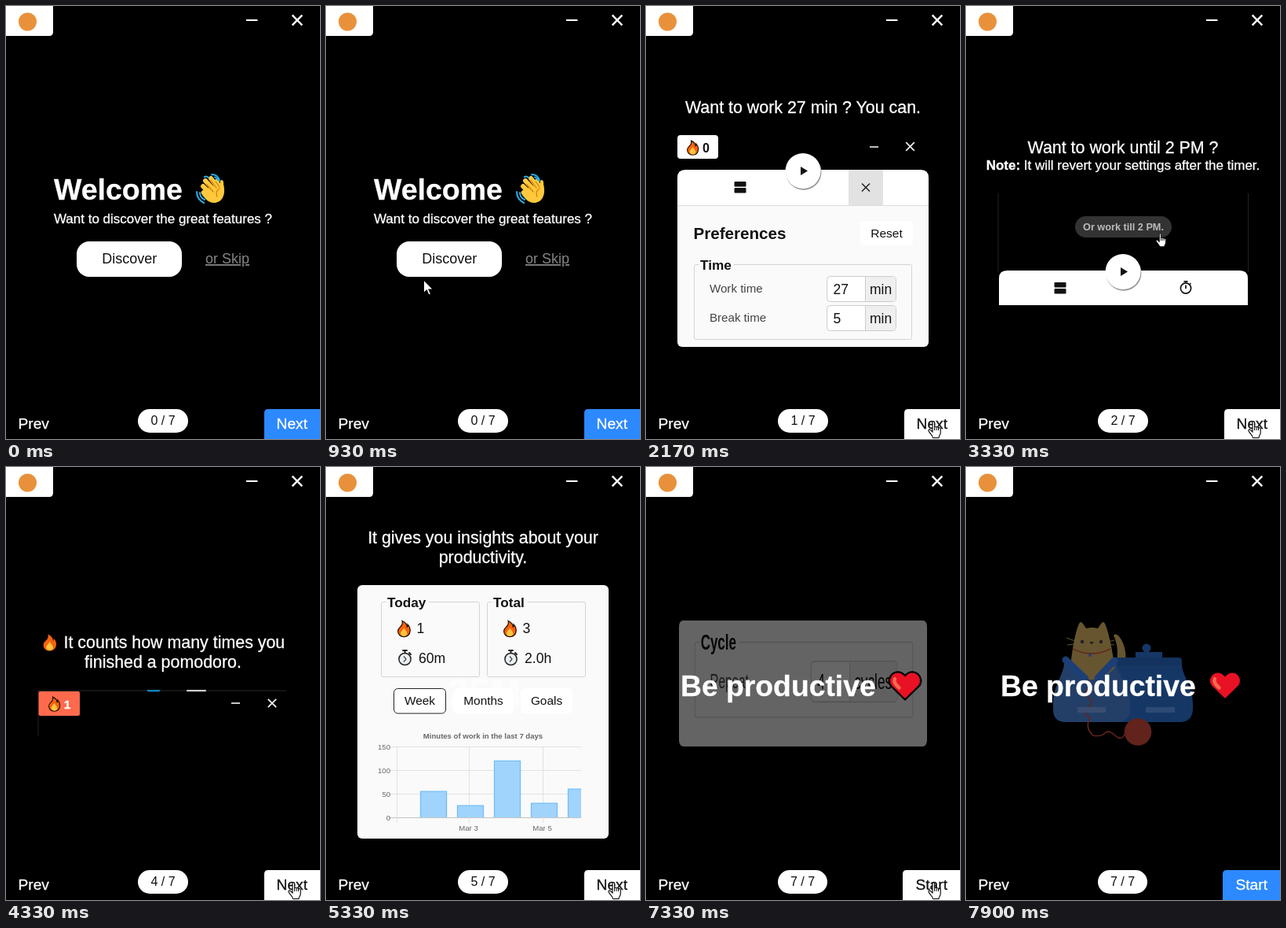
These frames come from a looping animation (400x550 px, 8.43 s). An HTML page:

```html
<!DOCTYPE html>
<html lang="en">
<head>
<meta charset="utf-8">
<title>Welcome tour</title>
<style>
  html, body { margin: 0; width: 100%; height: 100%; overflow: hidden; background: #000; }
  svg { display: block; width: 100%; height: 100%; font-family: "Liberation Sans", Arial, sans-serif; }
  text { white-space: pre; }
</style>
</head>
<body>
<svg id="stage" viewBox="0 0 400 550"></svg>
<script>
const LOOP = 8430;
const BLUE = '#2d89ff';

// ---- drawing helpers ----
// White text gets a hairline outline so that it reads as firmly as the dark text.
const text = (x, y, size, str, fill = '#fff', extra = '') =>
  `<text x="${x}" y="${y}" font-size="${size}" fill="${fill}" ${fill === '#fff' ? 'stroke="#fff" stroke-width=".3"' : ''} ${extra}>${str}</text>`;
const bold = (x, y, size, str, fill = '#111', extra = '') =>
  text(x, y, size, str, fill, 'font-weight="700" ' + extra);
const MID = 'text-anchor="middle"';
const title = (y, str) => text(200, y, 21.4, str, '#fff', MID);
const rect = (x, y, w, h, fill, r = 0, extra = '') =>
  `<rect x="${x}" y="${y}" width="${w}" height="${h}" rx="${r}" fill="${fill}" ${extra}/>`;
const path = (d, fill = 'none', stroke = 'none', width = 1, extra = '') =>
  `<path d="${d}" fill="${fill}" stroke="${stroke}" stroke-width="${width}" ${extra}/>`;
const circle = (x, y, r, fill, extra = '') =>
  `<circle cx="${x}" cy="${y}" r="${r}" fill="${fill}" ${extra}/>`;
const place = (x, y, content, scale = 1) =>
  `<g transform="translate(${x} ${y}) scale(${scale})">${content}</g>`;
const cross = (x, y, r, color, width) =>
  path(`M${x - r} ${y - r}l${2 * r} ${2 * r}m0 ${-2 * r}l${-2 * r} ${2 * r}`, 'none', color, width);
const dash = (x, y, w, color, h) => rect(x, y - h / 2, w, h, color);
const roundTop = (x, y, w, h, r, fill) =>
  path(`M${x} ${y + h}v${r - h}q0 ${-r} ${r} ${-r}h${w - 2 * r}q${r} 0 ${r} ${r}v${h - r}z`, fill);

// ---- small pictures ----
const ROUND = 'stroke-linecap="round" stroke-linejoin="round"';

const flame = (x, y, scale = 1, outline = '#1c0d04') => place(x, y,
  path('M6 .5C11 3 12 6 12 8C13 7.5 13 6 12.8 5C15.5 8 16 11 15.6 13.5C15 18 12 20 8 20C3.5 20 .5 17 .6 13C.7 9.5 4 8 5.5 5.5C6.3 4 6.4 2 6 .5Z',
    '#f7630c', outline, 1.2) +
  path('M8 9C9 12 12 13 12 16C12 18.3 10 19.3 8 19.3C5.5 19.3 4 18 4 16C4 13 7 12 8 9Z', '#fcc53f'), scale);

const stopwatch = (x, y) => place(x, y,
  path('M7 1.5h5M9.5 2v3M15 4.5l2 2', 'none', '#222', 2, ROUND) +
  circle(9.5, 12.5, 7.6, '#e9eef0', 'stroke="#222" stroke-width="1.5"') +
  path('M8 9l3 3.5l-3 3.5', 'none', '#444', 1.2));

const timerIcon = (x, y) =>
  circle(x, y, 6.6, 'none', 'stroke="#111" stroke-width="1.7"') +
  path(`M${x} ${y - 4}v4.5M${x - 2.5} ${y - 8.7}h5M${x + 5} ${y - 5}l1.4 -1.4`, 'none', '#111', 1.7);

const heart = path('M330 295.5L312 278C304 267 319 253 330 265C341 253 356 267 348 278Z',
    '#e81224', '#000', 2.4, 'stroke-linejoin="round"') +
  path('M317 269C315 274 319 277 322.5 280.5', 'none', '#f7694f', 4.5, ROUND);

const wave =
  path('M251 229L262 240M254 222L266 235M261 219L271 232M268 223L274 233', 'none', '#ffc83d', 6, ROUND) +
  path('M252 237L262 245', 'none', '#ffc83d', 6.5, ROUND) +
  path('M256 232L273 225C272 219 278 220 277 226C280 238 277 248 267 250C259 251 254 245 250 240Z', '#ffc83d') +
  path('M256 227L264 236M261 221L268 231M267 223L272 230M272 232C268 234 267 238 269 242', 'none', '#d67d00', 1.2, ROUND) +
  path('M262 214C267 214 271 217 272 222M258 218C256 216 255 216 253 217M243 236C243 242 246 247 252 250M247 237C247 241 249 244 253 246M266 217.5C268 218 269 219 270 221',
    'none', '#28afea', 2, ROUND);

const hand = path('M6 1.7C6 .2 8.6 .2 8.6 1.7V8C8.6 6.8 11 7 11 8.3C11.3 7.4 13.5 7.7 13.5 9C14 8.3 16.2 8.6 16.2 10.2V15C16.2 18 14 18.5 14 21.5H6.5C6.5 19 3 16.5 1 12.7C.4 11 2.3 10.3 3.5 11.7L6 14Z',
    '#fff', '#000', 1.1) + path('M8.6 8v4M11 8.5v3.5M13.5 9v3', 'none', '#000', 1);
const arrow = path('M.5 1V17.6L4.4 14L7 20L9.6 18.9L7 13H12.4Z', '#fff', '#000', 1.1);

// ---- pieces of the app shown in the tour ----
const bar = (y, x = 42, w = 317, h = 44) =>
  roundTop(x, y, w, h, 10, '#fff') +
  rect(112.5, y + 15, 15, 6.5, '#111', 1) + rect(112.5, y + 23, 15, 6.5, '#111', 1);
const playButton = y =>
  circle(200.8, y + 1.5, 22.7, '#999') + circle(200, y, 22.5, '#fff') +
  path(`M197 ${y - 5.5}v11l9 -5.5z`, '#111');
const sides = (y, h) => rect(40.5, y, 1, h, '#222') + rect(359, y, 1, h, '#222');

const fieldset = (x, y, w, h, legend, gap) =>
  rect(x, y, w, h, 'none', 2, 'stroke="#d4d4d4"') +
  rect(x + 6, y - 2, gap, 4, '#fafafa') + bold(x + 7.5, y + 6, 17.2, legend);

const field = (x, y, w, split, value, unit) =>
  rect(x, y, w, 32, '#fff', 4, 'stroke="#ccc"') +
  rect(x + split, y + .5, w - split - .5, 31, '#efefef', 3) +
  path(`M${x + split} ${y}v32`, 'none', '#ccc') +
  text(x + 8, y + 22, 17.5, value, '#111') + text(x + split + 5.5, y + 22, 17.5, unit, '#111');

const preferences =
  rect(40, 164, 52, 30, '#fff', 4) + flame(52, 170.5, .93) + bold(72, 185.5, 16, '0') +
  dash(285, 179, 11, '#ddd', 1.7) + cross(336.5, 178.5, 5.3, '#eee', 1.7) +
  rect(40, 230, 320, 203, '#fafafa', 6) + bar(208, 40, 320, 45) +
  rect(40, 253, 320, 1, '#ddd') + rect(258, 208, 44, 45, '#e2e2e2') +
  cross(280, 230.5, 5, '#222', 1.5) + playButton(209.5) +
  bold(60.5, 296, 20.6, 'Preferences') +
  rect(273, 273, 67, 31, '#fff', 4) + text(306.5, 294, 15.5, 'Reset', '#111', MID) +
  fieldset(61.5, 328.5, 277, 95, 'Time', 44) +
  text(81, 364, 15.1, 'Work time', '#444') + text(81, 401, 15.1, 'Break time', '#444') +
  field(230.5, 343.5, 88, 49, '27', 'min') + field(230.5, 380.5, 88, 49, '5', 'min');

const workUntil =
  sides(238, 100) + rect(139, 267, 123, 27, '#333', 13.5) +
  bold(200.5, 284.5, 12.7, 'Or work till 2 PM.', '#bbb', MID) + place(241.5, 288.5, hand, .8) +
  bar(336) + playButton(337.5) + timerIcon(280, 358.5);

const remaining =
  sides(227, 122) + bold(200, 303, 48, '25M', '#fff', MID) +
  bar(349) + playButton(350.5) + timerIcon(280, 371.5);

const counter =
  rect(40, 283.5, 317, 1.2, '#222') + rect(40.5, 284, 1, 57, '#222') +
  path('M179 283h18l-2 2.5h-14z', '#1a7fb5') + rect(230, 283, 25, 2.2, '#ccc', 1) +
  rect(41.5, 285, 52.5, 31, '#ff6a4d', 2) + flame(54, 291.5, .93) + bold(73.8, 306.5, 15.5, '1', '#fff') +
  dash(287, 300, 11, '#ddd', 1.8) + cross(339, 300, 5.2, '#eee', 1.8);

const summary = (x, legend, gap, count, time) =>
  fieldset(x + .5, 171.5, 125, 95, legend, gap) + flame(x + 21, 195, 1.03) +
  text(x + 45.5, 211, 17.6, count, '#111') + stopwatch(x + 21, 231.5) + text(x + 48, 248.5, 17.6, time, '#111');

const tab = (x, w, label, border) =>
  rect(x, 281.5, w, 31.5, '#fff', 5, `stroke="${border}"`) + text(x + w / 2, 302, 15.4, label, '#111', MID);

function chart() {
  const base = 445, perMinute = .597;
  let out = bold(200, 345, 9.55, 'Minutes of work in the last 7 days', '#666', MID);
  for (const value of [0, 50, 100, 150]) {
    const y = Math.round(base - value * perMinute) + .5;
    out += path(`M80 ${y}H325`, 'none', value ? '#e2e2e2' : '#c4c4c4') +
      text(82, y + 3, 9.55, value, '#666', 'text-anchor="end"');
  }
  out += path('M90.5 355V452M182.5 355V452M276.5 355V452', 'none', '#e2e2e2');
  [55, 25, 120, 30, 60].forEach((minutes, i) => {
    const x = 120 + 47 * i, h = minutes * perMinute, w = i === 4 ? 17 : 33.5;
    out += rect(x, base - h, w, h, '#a0d4fd') +
      path(`M${x + .5} ${base}v${-h}h${w - .5}` + (i < 4 ? `V${base}` : ''), 'none', '#73bff7', 1.3);
  });
  return out + text(181.5, 461.5, 9.6, 'Mar 3', '#666', MID) + text(275.5, 461.5, 9.6, 'Mar 5', '#666', MID);
}

const insights =
  rect(40, 150, 320, 322, '#fafafa', 6) + bold(202, 303, 48, '25M', '#fdfdfd', MID) +
  summary(70, 'Today', 54, '1', '60m') + summary(205, 'Total', 45, '3', '2.0h') +
  tab(86.5, 66, 'Week', '#222') + tab(162.5, 76, 'Months', '#fff') + tab(248.5, 65, 'Goals', '#fff') + chart();

const cycle =
  rect(0, 0, 320, 99, '#fafafa', 5) + fieldset(20.5, 17, 281, 59, 'Cycle', 51) +
  text(40, 53, 15.5, 'Repeat', '#444') + field(170.5, 32, 111, 50, '4', 'cycles');

const catInJar =
  path('M188 214C193 207 206 228 203 246H192C194 236 193 225 188 214Z', '#675530') +
  circle(230, 230, 5.5, '#153765') + rect(216, 235, 34, 9, '#153765') +
  path('M190 250H275C274 262 289 280 289 300V308Q288 324 272 324H195Z', '#153765') +
  rect(187, 242, 88, 10, '#13325d', 4) +
  path('M125 250H192C192 262 209 280 209 300V308Q208 324 192 324H127Q111 324 111 308V298C111 280 124 264 125 250Z', '#233f68') +
  path('M133 256C134 242 138 212 144 199Q146 195 149 199L153 205Q160 203 168 205L172 199Q175 195 177 199C183 213 188 240 189 256L172 270H150Z', '#675530') +
  path('M127 245L152 269M189 246L168 268', 'none', '#1c3f76', 9, ROUND) +
  path('M136 231Q160 243 184 231', 'none', '#642a1d', 1.8) + circle(158, 239, 2, '#27406b') +
  circle(148, 222, 2.2, '#222') + circle(172, 222, 2.2, '#222') +
  path('M157 222h6l-3 3.5z', '#222') +
  path('M128 217l11 4M129 226l10 -1M181 222l8 -2M181 225l8 1', 'none', '#675530', 1) +
  path('M155 270Q160 276 155 282T157 294T155 306T158 318Q151 332 162 341Q172 343 177 338T190 341T203 338', 'none', '#64241c', 1.6) +
  rect(142, 305, 36, 7, '#3a4d70', 1) + rect(229, 305, 37, 7, '#2d4a75', 1) +
  circle(219, 336.5, 17.3, '#61231b');

const closing = bold(44, 291, 37.3, 'Be productive', '#fff') + heart;

// ---- scenes and the time each one starts ----
const scenes = [
  [0, 0, bold(61, 246, 37.5, 'Welcome', '#fff') + wave +
    text(200, 276, 17, 'Want to discover the great features ?', '#fff', MID) +
    rect(90, 299, 134, 45, '#fff', 16) + text(157.3, 327, 18, 'Discover', '#111', MID) +
    text(282, 327, 18, 'or Skip', '#858585', MID + ' text-decoration="underline"')],
  [1370, 1, title(136, 'Want to work 27 min ? You can.') + preferences],
  [2330, 2, title(187, 'Want to work until 2 PM ?') +
    text(200, 208, 17, '<tspan font-weight="700">Note:</tspan> It will revert your settings after the timer.', '#fff', MID) + workUntil],
  [3370, 3, title(176, 'Want to see the remaining time ?') +
    text(200, 197, 17, '<tspan font-weight="700">Note:</tspan> It will be shown at the top of the screen.', '#fff', MID) + remaining],
  [4330, 4, flame(47, 212, 1.08, 'none') + text(73.5, 230, 21.4, 'It counts how many times you') +
    title(255, 'finished a pomodoro.') + counter],
  [5330, 5, title(97, 'It gives you insights about your') + title(122, 'productivity.') + insights],
  [6330, 6, title(208, 'You can repeat the cycles') + title(233, 'as many times as you want.') + place(40, 261, cycle)],
  [7330, 7, `<g opacity=".4" transform="translate(42 195) scale(.9875 1.616)">${cycle}</g>` + closing],
  [7370, 7, catInJar + closing]
];

const stage = document.getElementById('stage');
stage.innerHTML =
  path('M0 0H60V33Q60 38 55 38H0Z', '#fff') + circle(27.5, 20, 11.5, '#e8913a') +
  dash(306, 18, 14.5, '#fff', 2) + cross(371, 18, 6.3, '#fff', 2.4) +
  scenes.map(([, , content]) => `<g class="scene">${content}</g>`).join('') +
  text(15.5, 537, 19.2, 'Prev') +
  rect(168, 512, 64, 30, '#fff', 15, 'id="pill"') + text(200, 532, 16, '', '#111', MID + ' id="count"') +
  path('', BLUE, 'none', 0, 'id="button"') + text(384, 537, 19.2, '', '#fff', 'text-anchor="end" id="label"') +
  `<g id="arrow">${arrow}</g><g id="hand">${hand}</g>`;

const byId = id => document.getElementById(id);
const sceneNodes = [...document.querySelectorAll('.scene')];
const [pill, count, button, label, arrowNode, handNode] =
  ['pill', 'count', 'button', 'label', 'arrow', 'hand'].map(byId);

// ---- pointer: start, end, from, bend, to, easing ----
const easeOut = p => 1 - (1 - p) ** 2;
const easeInOut = p => p * p * (3 - 2 * p);
const moves = [
  [470, 1300, [0, 440], [80, 370], [153, 330], easeOut],
  [1470, 2170, [153, 330], [270, 450], [365, 527], easeInOut],
  [7630, 7900, [365, 527], [270, 535], [153, 551], p => p]
];

function pointerAt(time) {
  if (time < 470 || time >= 7900) return null;
  const [start, end, from, bend, to, ease] = moves.filter(move => time >= move[0]).pop();
  const p = ease(Math.min(1, (time - start) / (end - start))), q = 1 - p;
  return from.map((v, i) => q * q * v + 2 * p * q * bend[i] + p * p * to[i]);
}

function draw(time) {
  const current = scenes.filter(scene => time >= scene[0]).length - 1;
  const page = scenes[current][1];
  sceneNodes.forEach((node, i) => node.style.display = i === current ? '' : 'none');
  count.textContent = `${page} / 7`;
  pill.setAttribute('width', page === 7 ? 63 : 64);
  count.setAttribute('x', page === 7 ? 199.5 : 200);

  const left = page === 7 ? 327 : 329;
  const pointer = pointerAt(time);
  const [x, y] = pointer || [-50, -50];
  const overButton = x >= left && y >= 512;
  const overDiscover = page === 0 && x >= 90 && x <= 224 && y >= 299 && y <= 344;
  const ink = overButton ? '#111' : '#fff';
  button.setAttribute('d', `M${left} 550V517Q${left} 512 ${left + 5} 512H400V550Z`);
  button.setAttribute('fill', overButton ? '#fff' : BLUE);
  label.setAttribute('fill', ink);
  label.setAttribute('stroke', ink);
  label.textContent = page === 7 ? 'Start' : 'Next';

  const clickable = overButton || overDiscover;
  arrowNode.style.display = pointer && !clickable ? '' : 'none';
  handNode.style.display = pointer && clickable ? '' : 'none';
  arrowNode.setAttribute('transform', `translate(${x} ${y})`);
  handNode.setAttribute('transform', `translate(${x - 6} ${y})`);
}

const began = performance.now();
function frame() {
  draw((performance.now() - began) % LOOP);
  requestAnimationFrame(frame);
}
frame();
</script>
</body>
</html>
```
